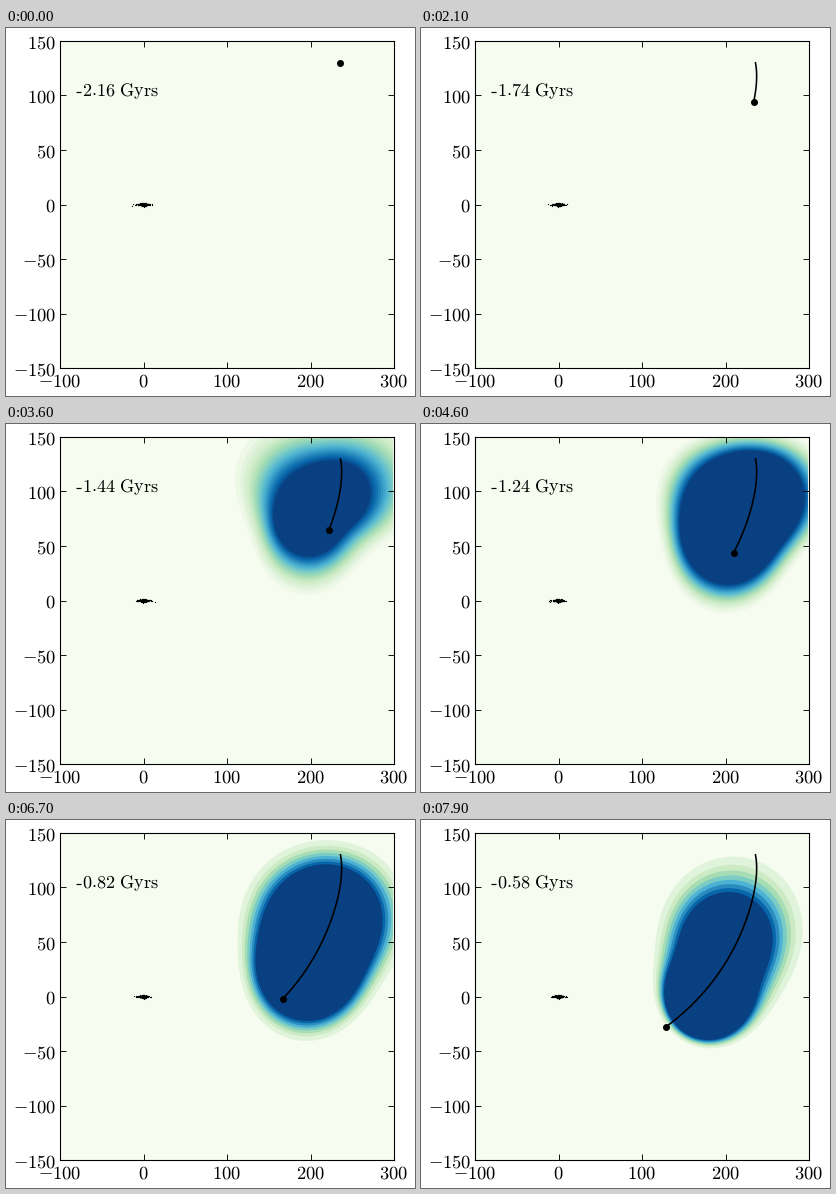
These frames come from a looping animation (409 by 368 pixels, 8000 ms). A matplotlib script:

```python
import numpy as np
import matplotlib.pyplot as plt
from matplotlib.animation import FuncAnimation
from matplotlib.collections import PolyCollection

W, H, DPI = 409, 368, 64
LEFT, RIGHT, TOP, BOTTOM = 54, 388, 13, 340
FRAMES = 80
ONSET, FULL = 23, 36  # steps at which the cloud appears and is fully lit
PT = 72 / DPI  # points per pixel

plt.rcParams["mathtext.fontset"] = "cm"
plt.rcParams["text.hinting"] = "none"


def to_data(px, py):
    x = (px - LEFT) / (RIGHT - LEFT) * 400 - 100
    y = 150 - (py - TOP) / (BOTTOM - TOP) * 300
    return x, y


fig = plt.figure(figsize=(W / DPI, H / DPI), dpi=DPI, facecolor="white")
ax = fig.add_axes([LEFT / W, 1 - BOTTOM / H,
                   (RIGHT - LEFT) / W, (BOTTOM - TOP) / H])
cmap = plt.get_cmap("GnBu")
ax.set_facecolor(cmap(0.0))
ax.set(xlim=(-100, 300), ylim=(-150, 150))
xt, yt = range(-100, 301, 100), range(-150, 151, 50)
ax.set_xticks(xt, [f"${v}$" for v in xt])
ax.set_yticks(yt, [f"${v}$" for v in yt])
ax.tick_params(direction="in", top=True, right=True, length=6 * PT,
               width=0.9 * PT, pad=4 * PT, labelsize=18.5 * PT)
for spine in ax.spines.values():
    spine.set_linewidth(1.1 * PT)

# Orbit of the satellite, smooth through a few positions
t = np.arange(FRAMES)
keys = [0, 21, 46, 67, 79]
orbit_x = np.polyval(np.polyfit(keys, [235.9, 233.8, 209.6, 167, 128.3], 4), t)
orbit_y = np.polyval(np.polyfit(keys, [130, 94.2, 44, -2.2, -28], 3), t)

theta = np.linspace(0, 2 * np.pi, 120, endpoint=False)


def wave(order, degrees):
    return np.cos(order * (theta - np.radians(degrees)))


def cloud_bands(i):
    """Nested contours of a tilted, slightly three-cornered cloud."""
    v = max(i, FULL)
    age = v - FULL
    late = age / (FRAMES - 1 - FULL)
    cx = 318.5 - 0.025 * (v - 50) ** 2
    cy = 82 + 0.65 * age + 0.0195 * age ** 2

    # The core swells and shrinks; the soft edge tightens with age
    grow = np.clip((i - ONSET) / (FULL - ONSET), 0, 1) ** 0.8
    size = 71 - 0.034 * (v - 60) ** 2 + 0.00033 * (v - 60) ** 3
    width = 22 + 21 * np.exp(-age / 6)
    core = size - 120 * (1 - grow)
    gap = (size + width) * grow - core

    tilt = 72 - 28 * (1 - late) ** 2
    flat = 0.11 + 0.13 * ((v - 50) / 29) ** 2
    tri = 0.055 * (1 - late ** 2) * wave(3, 20)
    lean = 0.65 * ((v - 53) / 26) ** 2
    shape = 1 + flat * wave(2, tilt) + tri
    edge = 1 + lean * wave(1, 65) + 3 * tri

    n = int(np.interp(i, [FULL, 46, 56], [18, 24, 8]))
    polys, colors = [], []
    for k in range(n):
        f = k / (n - 1)
        r = np.maximum(core * shape + gap * edge * (1 - f ** 0.75), 0)
        px = np.minimum(cx + r * np.cos(theta), RIGHT - 1)
        py = np.maximum(cy - r * np.sin(theta), TOP + 1.5)
        polys.append(np.column_stack(to_data(px, py)))
        colors.append(cmap((k + 1) / n))
    return polys, colors


# Edge-on galaxy: thin rotating disc plus a rounder bulge
rng = np.random.default_rng(5)
DISC, BULGE = 220, 120
radius = np.concatenate([rng.gamma(2.4, 1.8, DISC),
                         np.abs(rng.normal(0, 2.2, BULGE))])
phase = rng.uniform(0, 2 * np.pi, DISC + BULGE)
omega = 4 / (radius + 1)
height = np.concatenate([rng.normal(0, 0.35, DISC),
                         rng.normal(0, 0.75, BULGE)])
height = np.clip(height, -1.9, 1.9)

cloud = PolyCollection([], edgecolors="none", zorder=1)
ax.add_collection(cloud, autolim=False)
stars, = ax.plot([], [], "o", color="black", ms=1.2 * PT, mew=0, zorder=3)
trail, = ax.plot([], [], color="black", lw=1.6 * PT, zorder=3)
dot, = ax.plot([], [], "o", color="black", ms=7 * PT, mew=0, zorder=4)
ax.plot(*to_data(np.array([70.2, 75.2]), np.array([63.8, 63.8])),
        color="black", lw=1.2 * PT, solid_capstyle="butt")
label = ax.text(*to_data(76, 68), "", fontsize=18.2 * PT, va="baseline")


def draw(i):
    polys, colors = cloud_bands(i) if i > ONSET else ([], [])
    cloud.set_verts(polys)
    cloud.set_facecolor(colors)
    stars.set_data(radius * np.cos(phase + omega * i), height)
    trail.set_data(orbit_x[:i + 1], orbit_y[:i + 1])
    dot.set_data([orbit_x[i]], [orbit_y[i]])
    label.set_text(rf"$\mathrm{{{2.16 - 0.02 * i:.2f}\ Gyrs}}$")
    return cloud, stars, trail, dot, label


anim = FuncAnimation(fig, draw, frames=FRAMES, interval=100,
                     repeat=True, repeat_delay=0)
plt.show()
```
